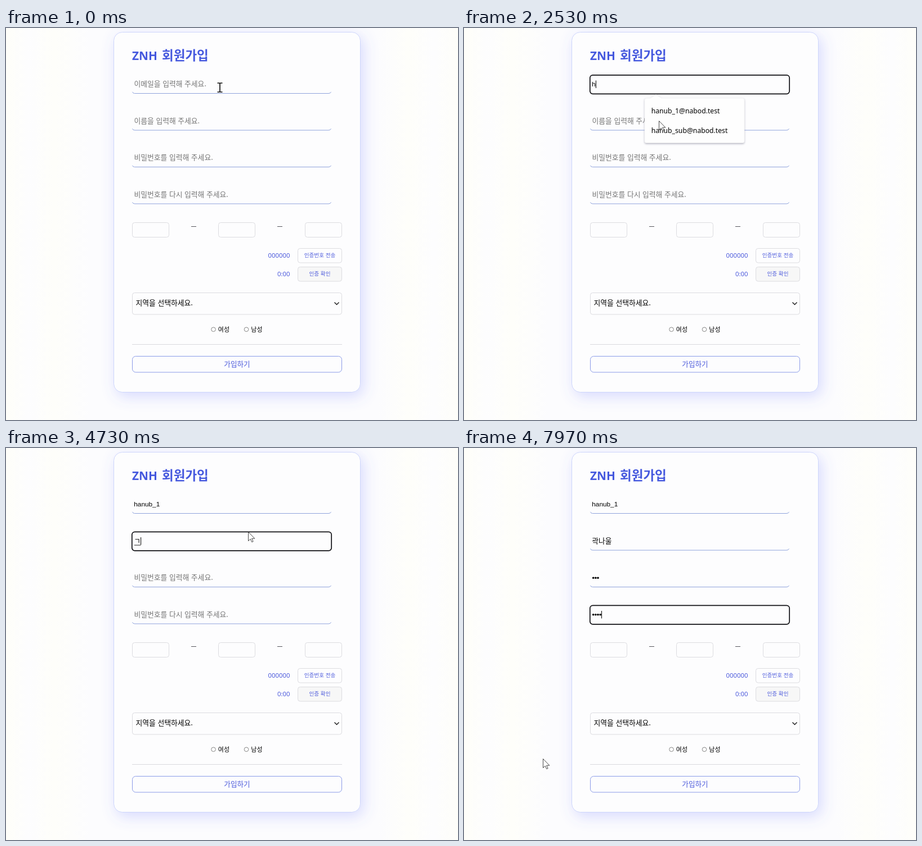
An HTML page that plays this animation: 803x698 px, repeating every 8000 ms.

```html
<!DOCTYPE html>
<html lang="ko">
<head>
<meta charset="utf-8">
<title>회원가입</title>
<style>
html, body { margin: 0; width: 100%; height: 100%; overflow: hidden; }
body {
  background: linear-gradient(90deg, #fefef9 0, #fdfdfe 40px, #fefefa 85px, #fcfcfe 150px,
    #fcfcfe 660px, #fefefa 715px, #fdfdfe 760px, #fefef9 803px);
}
svg { display: block; }
text { font: 12.8px "Noto Sans CJK KR", "Noto Sans CJK", "Noto Sans", sans-serif; white-space: pre; }
.latin { font-family: "Noto Sans", sans-serif; }
.arial { font-family: "Liberation Sans", Arial, sans-serif; }
.title { font-weight: 700; fill: #4558de; }
.blue { fill: #4d5bdc; }
.hint { fill: #757575; }
.box { fill: #fdfdfe; stroke: #dcdce0; }
.line { fill: none; stroke: #8fa3dc; }
.ring { fill: none; stroke: #101014; stroke-width: 1.7; }
</style>
</head>
<body>
<svg id="stage" width="803" height="698" viewBox="0 0 803 698">
  <defs>
    <filter id="glow" x="-20%" y="-20%" width="140%" height="140%">
      <feDropShadow dx="5" dy="7" stdDeviation="13" flood-color="#5868ff" flood-opacity=".23"/>
    </filter>
    <filter id="lift" x="-20%" y="-20%" width="140%" height="150%">
      <feDropShadow dx="0" dy="1.5" stdDeviation="1.6" flood-color="#303050" flood-opacity=".38"/>
    </filter>
    <linearGradient id="fill">
      <stop offset="0" stop-color="#efedf8"/>
      <stop offset=".22" stop-color="#e8f1ec"/>
      <stop offset=".45" stop-color="#ebe9fd"/>
      <stop offset=".7" stop-color="#e6f1ec"/>
      <stop offset="1" stop-color="#e8eef4"/>
    </linearGradient>
  </defs>
</svg>
<script>
const LOOP = 8000;
const stage = document.getElementById('stage');

function add(tag, attrs, parent = stage) {
  const el = document.createElementNS('http://www.w3.org/2000/svg', tag);
  for (const k in attrs) el.setAttribute(k, attrs[k]);
  return parent.appendChild(el);
}
function label(str, x, y, size, cls = '', anchor = 'start', parent = stage) {
  const el = add('text', { x, y, class: cls, 'text-anchor': anchor, style: `font-size:${size}px` }, parent);
  el.textContent = str;
  return el;
}
const box = (x, y, width, height, rx, attrs = {}, parent = stage) =>
  add('rect', { x, y, width, height, rx, ...attrs }, parent);
const show = (el, on) => el.setAttribute('visibility', on ? 'visible' : 'hidden');

// Static form
box(191.5, 7.5, 438, 641, 15, { fill: '#fdfdfe', stroke: '#cdd5fb', filter: 'url(#glow)' });
label('ZNH', 224, 57, 20.8, 'title latin');
label('회원가입', 277, 57.3, 22.5, 'title');

for (const x of [224.5, 377.5, 531.5]) box(x, 346.5, 65, 26, 4, { class: 'box' });
for (const x of [329, 482]) add('path', { d: `M${x} 353.5h9`, stroke: '#55555c' });

label('000000', 504.5, 409, 11.4, 'blue latin', 'end');
label('0:00', 504.5, 441.5, 11.4, 'blue latin', 'end');
box(518.5, 392.5, 78, 25.5, 4, { class: 'box' });
box(518.5, 425.5, 78, 25.5, 4, { fill: '#f7f7f7', stroke: '#dcdce0' });
label('인증번호 전송', 557.5, 408.2, 9.6, 'blue', 'middle');
label('인증 확인', 557.5, 441, 9.6, 'blue', 'middle');

box(224.5, 471.5, 372, 38.5, 4, { class: 'box' });
label('지역을 선택하세요.', 230.5, 494.3, 12.8);
add('path', { d: 'M583.5 488.5l4 4 4-4', fill: 'none', stroke: '#222', 'stroke-width': 1.5 });

[['여성', 368.5], ['남성', 427]].forEach(([str, x]) => {
  add('circle', { cx: x, cy: 536.7, r: 3.8, fill: '#fff', stroke: '#777', 'stroke-width': .9 });
  label(str, x + 8.3, 541, 11);
});
add('path', { d: 'M224 563.5h373', stroke: '#d9d9de' });
box(224.5, 584.5, 372, 28.5, 6, { fill: '#fdfdfe', stroke: '#8b9be8' });
label('가입하기', 410.5, 603.3, 12.6, 'blue', 'middle');

// Text fields: focus span, then [time, value] steps
const typed = (str, start, step) => [...str].map((_, i) => [start + i * step, str.slice(0, i + 1)]);
const fields = [
  { hint: '이메일을 입력해 주세요.', focus: [260, 4350], steps: typed('hanub_1', 2450, 133), arial: true },
  { hint: '이름을 입력해 주세요.', focus: [4350, 5600], ime: true,
    steps: ['ㄱ', '고', '과', '곽', '곽ㄴ', '곽나', '곽낭', '곽나우', '곽나울'].map((s, i) => [4650 + i * 100, s]) },
  { hint: '비밀번호를 입력해 주세요.', focus: [5600, 6220], dots: true,
    steps: typed('•••', 5800, 130) },
  { hint: '비밀번호를 다시 입력해 주세요.', focus: [6220, LOOP], dots: true,
    steps: [[6850, '•'], [7030, '••'], [7210, '•••'], [7480, '••••']] }
];

fields.forEach((f, i) => {
  const y = f.y = 83.8 + i * 65.5;
  f.line = add('path', { class: 'line', d: `M224.5 ${y + 30}q1 2.7 4 2.7H573q3.5 0 4.5-2.7` });
  if (!i) f.tint = box(223.8, y, 354.4, 33.5, 5, { fill: 'url(#fill)' });
  f.ring = box(223.8, y, 354.4, 33.5, 5, { class: 'ring' });
  f.place = label(f.hint, 227.5, y + 20.2, 12.8, 'hint');
  f.text = label('', 227.3, y + (f.arial ? 20.4 : 21), f.arial ? 11.8 : 12.7, f.arial ? 'arial' : '');
  f.bullets = f.dots ? f.steps.map((_, n) =>
    add('circle', { cx: 229.7 + n * 4.15, cy: y + 16.5, r: 1.8 })) : [];
  f.mark = add('path', { stroke: '#222' });
  f.caret = add('path', { stroke: '#111', 'stroke-width': 1.1 });
});

// Suggestion list
const popup = add('g');
const panel = add('path', { fill: '#fefefe', stroke: '#ececf0', 'stroke-width': .6, filter: 'url(#lift)' }, popup);
const hover = box(321, 129, 177, 35.5, 0, { fill: '#f0f0ee' }, popup);
label('hanub_1@nabod.test', 332.7, 151.7, 12.2, 'latin', 'start', popup);
const second = label('hanub_sub@nabod.test', 332.7, 187.3, 12.2, 'latin', 'start', popup);
const preview = label('hanub_1@nabod.test', 227.3, 104, 8.6, 'arial');
const panelPath = (w, h) => `M324 125H331L341 118.5 351 125H${318 + w}q3 0 3 3v${h - 6}q0 3-3 3H324q-3 0-3-3v${6 - h}q0-3 3-3z`;

// Pointer
const beam = add('path', { d: 'M-4.5-8h3.5l1 1 1-1h3.5M0-7V7M-4.5 8h3.5l1-1 1 1h3.5', fill: 'none', stroke: '#111', 'stroke-width': 1.7 });
const arrow = add('path', { d: 'M.5.5v16l3.7-3.4 2.6 5.4 2.3-1.1-2.5-5.2h5.2z', fill: '#fff', stroke: '#333', 'stroke-width': .9 });
const moves = [
  [300, 380, 106], [620, 539, 149], [1000, 539, 149], [1500, 430, 148], [1950, 430, 148],
  [2300, 346, 165], [3650, 346, 165], [4100, 430, 149], [7500, 430, 149], [7900, 140, 553]
];

function pointerAt(t) {
  const i = moves.findIndex(m => m[0] > t);
  if (i <= 0) return moves[i ? moves.length - 1 : 0].slice(1);
  const [t0, x0, y0] = moves[i - 1], [t1, x1, y1] = moves[i];
  const u = (t - t0) / (t1 - t0), e = u * u * (3 - 2 * u);
  return [x0 + (x1 - x0) * e, y0 + (y1 - y0) * e];
}

function drawField(f, t, previewing) {
  const [from, to] = f.focus;
  const active = t >= from && t < to;
  const step = f.steps.filter(s => s[0] <= t).pop();
  const value = step ? step[1] : '';
  f.text.textContent = f.dots ? '' : value;
  f.bullets.forEach((b, n) => show(b, n < value.length));
  show(f.place, !value && !previewing);
  show(f.ring, active);
  show(f.line, !active);

  const width = f.dots ? value.length * 4.15 : value ? f.text.getComputedTextLength() : 0;
  const x = 227.9 + width;
  const since = t - Math.max(from, step ? step[0] : 0);
  f.caret.setAttribute('d', `M${x} ${f.y + 9.7}v13.5`);
  show(f.caret, active && since % 1060 < 530);
  f.mark.setAttribute('d', `M${x - 11.7} ${f.y + 23.7}h11.4`);
  show(f.mark, f.ime && active && value);
}

function draw(t) {
  const [x, y] = pointerAt(t);
  const inList = t > 1000 && t < 2300 && x < 498 && y > 129 && y < 164.5;
  const previewing = inList && t < 2250;
  fields.forEach((f, i) => drawField(f, t, !i && previewing));
  show(fields[0].tint, previewing);
  show(preview, previewing);

  const open = t >= 360 && t < 4350;
  const narrow = t >= 3248;
  popup.setAttribute('display', open ? 'inline' : 'none');
  panel.setAttribute('d', narrow ? panelPath(153, 44) : panelPath(177, 79.5));
  hover.setAttribute('display', inList ? 'inline' : 'none');
  second.setAttribute('display', narrow ? 'none' : 'inline');

  const overField = t < 620 && y < 117;
  show(beam, overField);
  show(arrow, !overField);
  for (const el of [beam, arrow]) el.setAttribute('transform', `translate(${x} ${y})`);
}

const start = performance.now();
function tick() {
  draw((performance.now() - start) % LOOP);
  requestAnimationFrame(tick);
}
tick();
</script>
</body>
</html>
```
